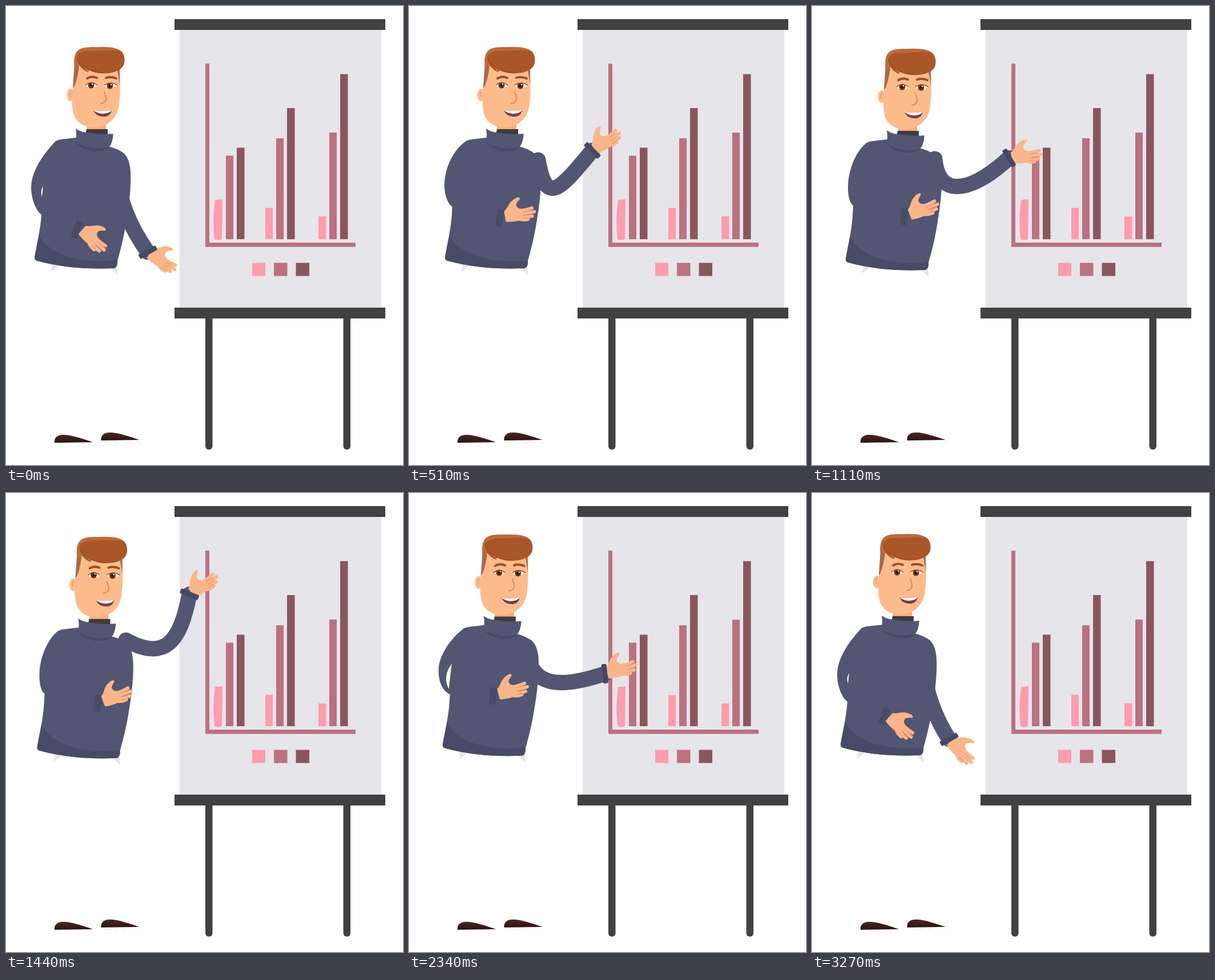
Animation, 695 px wide and 805 px high, one loop 3.3 s. Source, as an HTML page without scripts:

```html
<!DOCTYPE html>
<html lang="en">
<head>
<meta charset="utf-8">
<title>Presenter</title>
<style>
html, body { margin: 0; width: 100%; height: 100%; overflow: hidden; background: #fff; }
svg { display: block; width: 100vw; height: 100vh; }
.move, .move * { animation: 3.3s linear infinite; }

.body { animation-name: sway; }
@keyframes sway {
  0%, 99.1%, 100% { translate: 0 0; }
  15.5% { translate: 13px 0; }
  33.6% { translate: 9px 3px; }
  43.6% { translate: 4.5px 5px; }
  59.1% { translate: 7.5px 2.5px; }
  80.9% { translate: 10px -.5px; }
}

.back-arm { animation-name: back-arm; }
@keyframes back-arm {
  0%, 99.1%, 100% { d: path("M88 236C66 258 44 290 44 318C44 342 55 362 62 366L110 300Z"); }
  15.5% { d: path("M88 236C64 252 49 285 49 314C49 334 56 348 63 352L110 300Z"); }
  33.6%, 43.6% { d: path("M88 236C68 250 54 285 54 314C54 334 58 343 63 347L110 300Z"); }
  59.1%, 80.9% { d: path("M88 236C64 254 42 285 43 312C43 334 52 347 62 352L110 300Z"); }
}

.gap { animation-name: gap; }
@keyframes gap {
  0%, 99.1%, 100% { d: path("M65 316C61 322 61 328 63 334C64 328 64 322 65 316"); }
  10%, 46% { d: path("M64 325C64 325 64 325 64 325C64 325 64 325 64 325"); }
  59.1%, 80.9% { d: path("M66 299C55 312 53 329 61 343C62 330 64 315 66 299"); }
}

.left { animation-name: left-wrist; }
@keyframes left-wrist {
  0% { translate: 132px 391px; }
  15.5% { translate: 166px 369px; }
  33.6% { translate: 169px 366px; }
  43.6% { translate: 168px 366px; }
  59.1% { translate: 153px 355px; }
  80.9% { translate: 156px 351px; }
  92%, 100% { translate: 134px 391px; }
}
.left .palm { animation-name: left-palm; }
@keyframes left-palm {
  0%, 92%, 100% { rotate: 42deg; }
  15.5%, 80.9% { rotate: -10deg; }
  33.6%, 59.1% { rotate: -21deg; }
}
.left .cuff { animation-name: left-cuff; }
@keyframes left-cuff {
  0%, 92%, 100% { rotate: 22deg; }
  15.5%, 80.9% { rotate: 7deg; }
}

.arm { animation-name: arm; }
@keyframes arm {
  0% { d: path("M195 300C200 350 222 395 248 432"); }
  8.2% { d: path("M210 290C220 345 270 350 325 345"); }
  15.5% { d: path("M226 270C240 350 262 325 321 253"); }
  33.6% { d: path("M215 268C222 347 290 318 345 267"); }
  38.6% { d: path("M213 263C240 320 300 300 352 225"); }
  43.6% { d: path("M210 258C278 295 305 262 321 177"); }
  51.5% { d: path("M212 268C240 330 300 310 342 245"); }
  59.1% { d: path("M212 280C225 352 296 328 341 310"); }
  72.7% { d: path("M208 290C222 350 290 335 343 318"); }
  80.9% { d: path("M205 335C205 358 240 366 290 376"); }
  90%, 100% { d: path("M195 300C198 350 218 398 240 432"); }
}
.right { animation-name: right-wrist; }
@keyframes right-wrist {
  0% { translate: 248px 432px; }
  8.2% { translate: 325px 345px; }
  15.5% { translate: 321px 253px; }
  33.6% { translate: 345px 267px; }
  38.6% { translate: 352px 225px; }
  43.6% { translate: 321px 177px; }
  51.5% { translate: 342px 245px; }
  59.1% { translate: 341px 310px; }
  72.7% { translate: 343px 318px; }
  80.9% { translate: 290px 376px; }
  90%, 100% { translate: 240px 432px; }
}
.right .cuff { animation-name: right-cuff; }
@keyframes right-cuff {
  0%, 90%, 100% { rotate: 61deg; }
  8.2%, 72.7% { rotate: -5deg; }
  15.5% { rotate: -45deg; }
  33.6% { rotate: -30deg; }
  38.6% { rotate: -50deg; }
  43.6% { rotate: -68deg; }
  51.5% { rotate: -35deg; }
  59.1% { rotate: -14deg; }
  80.9% { rotate: 18deg; }
}
.right .palm { animation-name: right-palm; }
@keyframes right-palm {
  0% { rotate: 32deg; }
  8.2% { rotate: 5deg; }
  15.5%, 43.6% { rotate: -34deg; }
  33.6% { rotate: -7deg; }
  38.6% { rotate: -25deg; }
  51.5%, 59.1% { rotate: -29deg; }
  72.7% { rotate: -15deg; }
  80.9% { rotate: 18deg; }
  90%, 100% { rotate: 45deg; }
}
</style>
</head>
<body>
<svg viewBox="0 0 695 805">
  <defs>
    <g id="hand" stroke-linecap="round" stroke-linejoin="round">
      <path fill="#fbb58a" d="M0-9C7-12 9-20 16-24C22-28 29-30 31-27C32-24 25-22 23-17C22-13 25-9 30-8L33 9C24 14 10 12 0 10Z"/>
      <path fill="none" stroke="#fbb58a" stroke-width="6" d="M24-5Q38-4 49-6M26 0Q40 2 52 1M24 5Q36 9 47 8M22 8Q30 13 39 12"/>
      <path fill="none" stroke="#e0936a" d="M33-2L47-2M33 4L46 4M31 9L41 10"/>
    </g>
    <linearGradient id="leather" x2="0" y2="1">
      <stop stop-color="#4a2823"/><stop offset="1" stop-color="#2b1412"/>
    </linearGradient>
    <path id="shoe" d="M85 766C84 758 89 752 100 752C116 752 137 760 152 765Z" fill="url(#leather)"/>
  </defs>

  <g fill="#414141">
    <rect x="295" y="23" width="369" height="19"/>
    <rect x="349" y="540" width="12.500" height="238" rx="6"/>
    <rect x="590.500" y="540" width="12.500" height="238" rx="6"/>
    <rect x="304" y="42" width="353" height="488" fill="#e6e5ea"/>
    <rect x="295" y="529" width="369" height="19"/>
  </g>
  <path fill="#bb7180" d="M349 101H356V415H612V422.500H349ZM385 262.500H398V409H385ZM473 232H486V409H473ZM566 222H579V409H566ZM469 450.500H492.500V473.500H469Z"/>
  <path fill="#8a565e" d="M404 248.500H417.500V409H404ZM492 179H505.500V409H492ZM585 119.500H598.500V409H585ZM507.500 450.500H531V473.500H507.500Z"/>
  <path fill="#ff9cad" d="M366 340L379 339L378 409Q371 412 365 409Q361 375 366 340ZM454 354H467V409H454ZM547 369H560.500V409H547ZM431 450.500H454V473.500H431Z"/>

  <use href="#shoe"/>
  <use href="#shoe" x="81.500" y="-4"/>
  <path d="M92 771.500H146M176 766H242" stroke="#eee" stroke-dasharray="6 8"/>

  <g class="move">
    <g class="body">
      <path fill="#e4e4e8" d="M79 466L81 453L92 456ZM195 472L183 460L194 457Z"/>
      <g fill="#535672">
        <path class="back-arm" d="M88 236C66 258 44 290 44 318C44 342 55 362 62 366L110 300Z"/>
        <path d="M122 231L96 234Q88 235 84 240C72 270 66 300 62 366C60 395 54 415 50 441Q50 446 55 447C95 458 140 462 189 460Q196 458 195 447C203 420 208 395 211 375C217 340 219 310 218 292Q217 268 206 258Q198 252 186 248Z"/>
      </g>
      <path class="gap" fill="#fff" d="M65 316C61 322 61 328 63 334C64 328 64 322 65 316"/>
      <path fill="#484b67" d="M58 402C72 432 120 453 195 446Q196 458 189 460C140 462 95 458 55 447Q50 446 50 441Z"/>

      <path fill="#f7ad7c" d="M143 200H175V218H141Z"/>
      <path fill="#3d3c3e" d="M141 216H178V226H139Z"/>
      <path fill="#484b67" d="M121 237C130 255 166 260 181 248L170 238Z"/>
      <path fill="#535672" d="M122 215C130 221 140 222 150 223C165 225 178 225 187 224C187 235 183 245 179 248C160 253 135 249 121 238C124 230 123 222 122 215Z"/>
      <path fill="none" stroke="#484b67" d="M187 224C187 235 183 245 179 248C160 253 135 249 121 238"/>

      <ellipse cx="113" cy="156" rx="6.500" ry="11" fill="#fdbb8c"/>
      <path fill="none" stroke="#e59b6d" stroke-width="1.500" d="M115 150Q109 151 113 160"/>
      <path fill="#fdbb8c" d="M118 130C115 160 114 182 121 196C130 211 148 215 163 212C184 208 196 192 198 172Q201 145 199 112Q160 92 122 105Z"/>
      <path fill="#a8694a" d="M120 98L117 144Q123 139 128 107ZM195 112L199 111V137Z"/>
      <path fill="#bd6a3b" d="M120 108C118 94 120 82 127 77C136 71 150 72 162 72C182 71 200 74 204 82L150 108L143 116Q134 112 129 105Z"/>
      <path fill="#a95728" d="M124 90C126 80 140 78 155 79C180 78 192 75 204 82C209 89 209 102 203 108C194 117 178 119 165 118C152 117 143 112 137 106Q139 112 143 116Q126 108 124 90Z"/>
      <path fill="none" stroke="#944718" d="M124 90Q127 102 138 107M137 106Q150 117 168 116"/>

      <path fill="none" stroke="#9b4e25" stroke-width="4" stroke-linecap="round" d="M142 127Q150 122 159 126M175 126Q183 123 193 127"/>
      <g fill="#fff">
        <path d="M139 140Q149 131 160 140Q149 147 139 140ZM172 140Q183 131 194 140Q183 147 172 140Z"/>
        <g fill="#6e3719">
          <circle cx="149" cy="139" r="5.500"/><circle cx="182" cy="140" r="5.500"/>
        </g>
        <g fill="#2c130b">
          <circle cx="149" cy="139" r="2.500"/><circle cx="182" cy="140" r="2.500"/>
        </g>
        <circle cx="151" cy="137" r="1.200"/><circle cx="184" cy="138" r="1.200"/>
      </g>
      <path fill="none" stroke="#91512f" stroke-width="1.500" d="M139 139Q149 130 160 139M172 139Q183 131 195 139"/>
      <path fill="none" stroke="#d58b5e" stroke-width="2" stroke-linecap="round" d="M172 150Q176 161 175 165Q172 171 166 171"/>
      <path fill="#7c3d4e" d="M153 183Q170 186 185 182Q183 195 169 194Q157 193 153 183Z"/>
      <path fill="#fff" d="M153 183Q170 186 185 182Q183 188 169 189Q159 188 153 183Z"/>
    </g>

    <path class="arm" fill="none" stroke="#535672" stroke-width="27" d="M195 300C200 350 222 395 248 432" style="stroke-linecap:round"/>
    <g class="right">
      <use class="palm" href="#hand" x="4"/>
      <rect class="cuff" x="-4.500" y="-17" width="9" height="34" rx="2" fill="#454863"/>
    </g>
    <g class="left">
      <rect class="cuff" x="-13" y="-11" width="12" height="30" rx="2" fill="#484b67"/>
      <use class="palm" href="#hand" x="2"/>
    </g>
  </g>
</svg>
</body>
</html>
```
